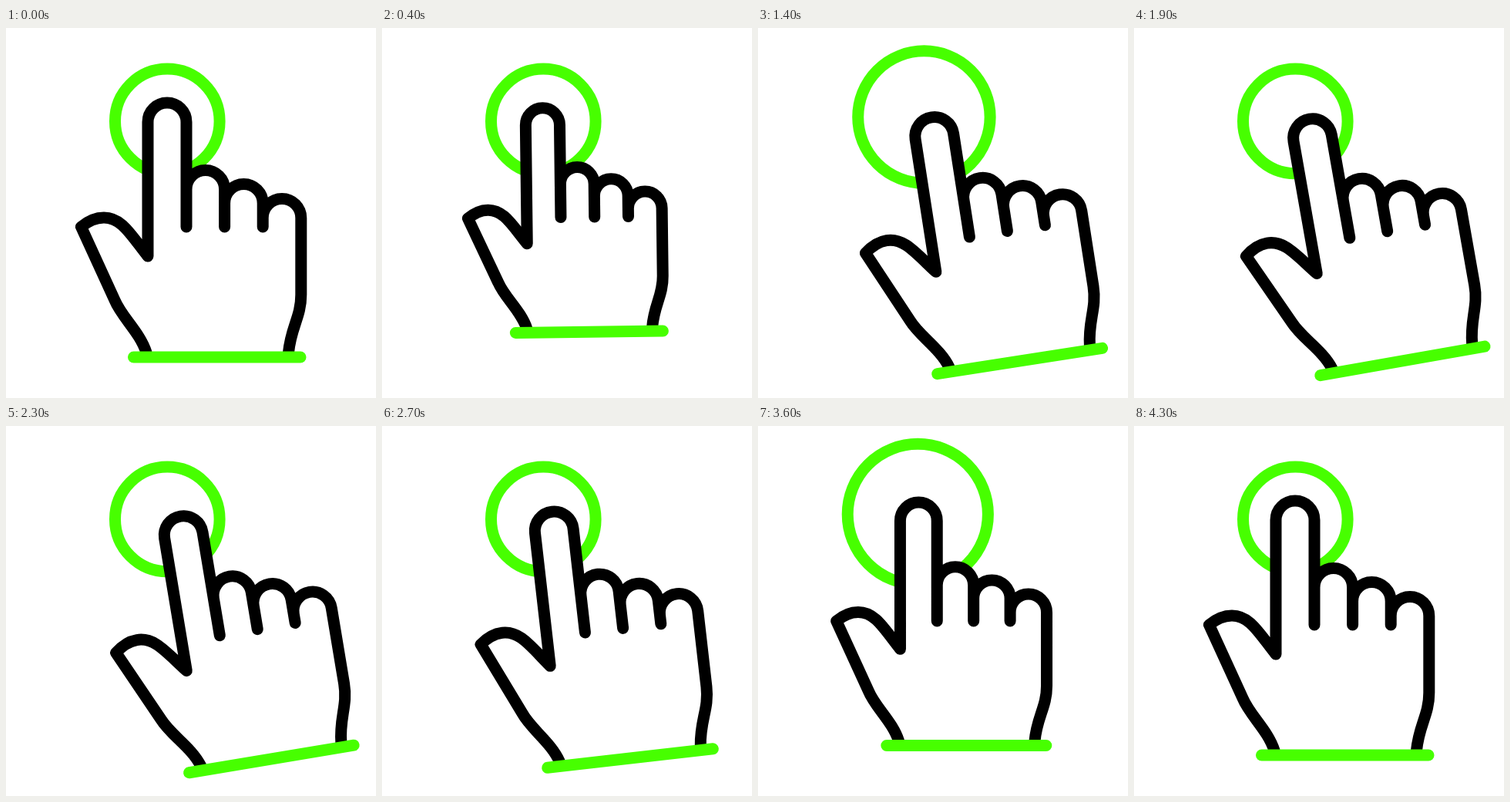
These frames come from a looping animation (480x480 px, 4.4 s). An HTML page:

```html
<!DOCTYPE html>
<html lang="en">
<head>
<meta charset="utf-8">
<title>Tap</title>
<style>
  html, body { margin: 0; width: 100%; height: 100%; overflow: hidden; background: #fff; }
  svg { display: block; width: 100%; height: 100%; }
  path, circle { stroke-width: 15; stroke-linecap: round; stroke-linejoin: round; }
</style>
</head>
<body>
<svg viewBox="0 0 480 480">
  <circle id="ring" fill="none" stroke="#47ff00"/>
  <g id="hand">
    <path fill="#fff" stroke="#000" d="M182 421C174 395 150 375 141 353L97.5 258Q112 246 127 246C150 246 161 267 184 296
      V122A25 25 0 0 1 234 122V258V209.5A24.8 25 0 0 1 283.6 209.5V258V227.5A24.8 25 0 0 1 333.2 227.5V258
      V246.5A24.8 25 0 0 1 382.8 246.5V346C382.8 375 369.5 388 366.5 421"/>
    <path fill="none" stroke="#47ff00" d="M165.5 427H382"/>
  </g>
</svg>
<script>
const LOOP = 4400, STEP = 100, STROKE = 15;
const ring = document.getElementById('ring');
const hand = document.getElementById('hand');
const lines = hand.querySelectorAll('path');

function ease(t, start, end) {
  const u = Math.min(1, Math.max(0, (t - start) / (end - start)));
  return u * u * (3 - 2 * u);
}

// Rises from 0 to 1 at the peak and falls back to 0.
const pulse = (t, start, peak, end) => ease(t, start, peak) - ease(t, peak, end);

function draw(t) {
  const angle = -10 * (ease(t, 140, 1740) - ease(t, 2080, 3640));
  const scale = 1 - 0.15 * pulse(t, 167, 500, 1100) - 0.079 * pulse(t, 2667, 3000, 4300);
  hand.setAttribute('transform',
    `translate(193 143) scale(${scale}) translate(-193 -143) rotate(${angle} 339 3)`);
  // Line weight stays constant while the hand shrinks.
  lines.forEach(line => line.style.strokeWidth = STROKE / scale);

  const first = pulse(t, 467, 1175, 1890);
  const second = pulse(t, 2840, 3570, 4300);
  ring.setAttribute('cx', 209.3 + 8 * first - 2 * second);
  ring.setAttribute('cy', 120.9 - 7 * first - 6.5 * second);
  ring.setAttribute('r', 67.8 + 23.4 * (first + second));
}

const origin = performance.now();
function frame() {
  const t = (performance.now() - origin) % LOOP;
  draw(Math.floor(t / STEP) * STEP);
  requestAnimationFrame(frame);
}
frame();
</script>
</body>
</html>
```
